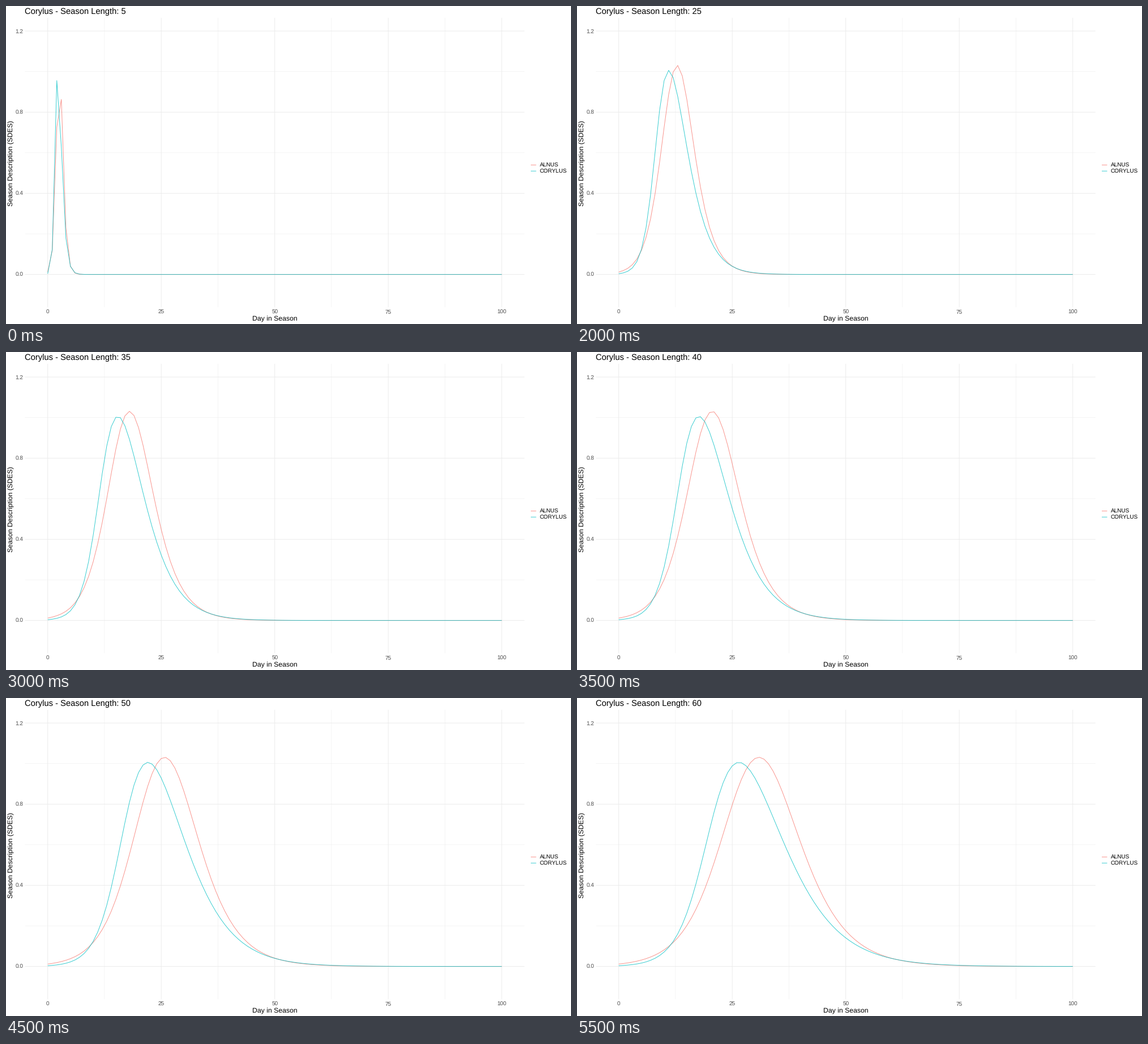
A matplotlib script that plays this animation: 998x561 px, repeating every 6000 ms.

```python
import numpy as np
import matplotlib.pyplot as plt
from matplotlib.animation import FuncAnimation

WIDTH, HEIGHT, DPI = 998, 561, 64
RED, TEAL, GREY = "#F8766D", "#00BFC4", "#4D4D4D"
BASE = 12.3  # base font size in pixels

plt.rcParams["font.family"] = "Liberation Sans"
plt.rcParams["text.hinting"] = "none"


def points(pixels):
    return pixels * 72 / DPI


def px(day):
    return 73.2 + 8.02 * np.asarray(day)


def py(value):
    return 473.1 - 357.9 * np.asarray(value)


def alnus(u):
    rise = 1 / (1 + np.exp(-11.85 * (u - 0.4655)))
    return rise / (0.332 + 24.04 * np.exp(9.1 * (u - 1)))


def corylus(u):
    rise = (1 + np.exp(-16.5 * (u - 0.339))) ** (-1 / 0.9)
    return rise / (0.525 + 24.475 * np.exp(7.89 * (u - 1)))


fig = plt.figure(figsize=(WIDTH / DPI, HEIGHT / DPI), dpi=DPI, facecolor="white")
ax = fig.add_axes([0, 0, 1, 1])
ax.set_xlim(-0.5, WIDTH - 0.5)
ax.set_ylim(HEIGHT - 0.5, -0.5)
ax.axis("off")


def line(xs, ys, color, width, **style):
    return ax.plot(xs, ys, color=color, lw=points(width), snap=False,
                   solid_capstyle="butt", **style)[0]


def label(x, y, text, size, color="black", ha="center", **style):
    return ax.text(x, y, text, fontsize=points(size), color=color,
                   ha=ha, va="baseline", **style)


def grid(days, values, width):
    for value in values:
        line(px([-5, 105]), [py(value)] * 2, "#EBEBEB", width)
    for day in days:
        line([px(day)] * 2, [20.3, 530.8], "#EBEBEB", width)


major_days, major_values = [0, 25, 50, 75, 100], [0, 0.4, 0.8, 1.2]
grid([12.5, 37.5, 62.5, 87.5], [0.2, 0.6, 1.0], 0.5)
grid(major_days, major_values, 0.95)

for day in major_days:
    label(px(day), 542.8, str(day), 0.81 * BASE, GREY)
for value in major_values:
    label(30, py(value) + 3.6, f"{value:.1f}", 0.81 * BASE, GREY, "right")

label(474.2, 555, "Day in Season", BASE)
label(12, 276.5, "Season Description (SDES)", BASE, rotation=90,
      rotation_mode="anchor")
title = label(32.7, 13.7, "", 1.2 * BASE, ha="left")

curves = []
for name, color, shape, y in (("ALNUS", RED, alnus, 280),
                              ("CORYLUS", TEAL, corylus, 290.7)):
    line([926.5, 936], [y, y], color, 0.95, alpha=0.8)
    label(942, y + 3.7, name, 0.81 * BASE, ha="left")
    curve = line([], [], color, 0.95, alpha=0.8, solid_joinstyle="round")
    curves.append((curve, shape))

days = np.arange(101)


def draw(frame):
    length = 5 * (frame + 1)
    title.set_text(f"Corylus - Season Length: {length}")
    for curve, shape in curves:
        curve.set_data(px(days), py(shape(days / length)))
    return [title] + [curve for curve, _ in curves]


animation = FuncAnimation(fig, draw, frames=12, interval=500, repeat=True,
                          repeat_delay=0)
plt.show()
```
